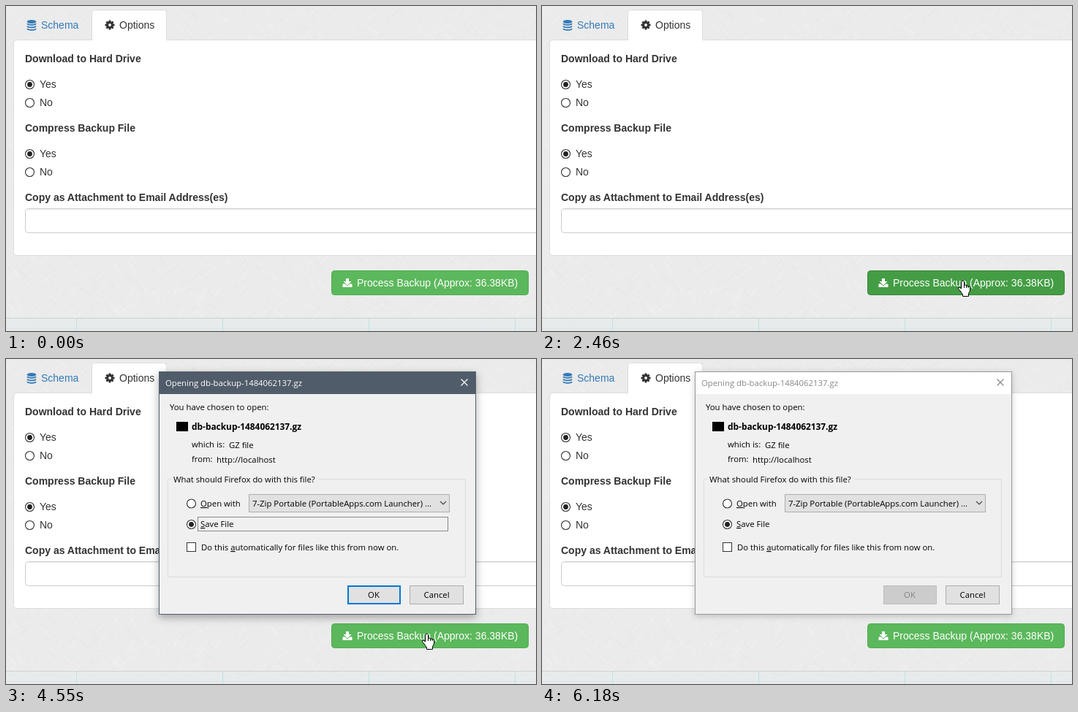
Recreate the animation shown at these times as an HTML page. Size 725 by 445 pixels, loop 6330 ms.

```html
<!DOCTYPE html>
<html lang="en">
<head>
<meta charset="utf-8">
<title>Backup options</title>
<style>
  html, body { margin: 0; width: 100%; height: 100%; overflow: hidden; background: #ebebeb; }
  svg { display: block; width: 725px; height: 445px; }
  text { font: 14px "Liberation Sans", Arial, sans-serif; fill: #333; white-space: pre; }
  .bold { font-weight: bold; }
  #dialog text { font: 11.33px "Open Sans", "Noto Sans", sans-serif; fill: #000; }
  #dialog text.name { font-size: 11.9px; font-weight: bold; }
  #dialog .mid { text-anchor: middle; }
  .key { text-decoration: underline; }
</style>
</head>
<body>
<svg viewBox="0 0 725 445" xmlns="http://www.w3.org/2000/svg">
  <defs>
    <filter id="deep" x="-10%" y="-10%" width="120%" height="125%">
      <feDropShadow dx="0" dy="4" stdDeviation="6" flood-opacity=".32"/>
    </filter>
    <filter id="soft" x="-10%" y="-10%" width="120%" height="120%">
      <feDropShadow dx="0" dy="2" stdDeviation="4" flood-opacity=".2"/>
    </filter>
  </defs>

  <rect width="725" height="445" fill="#ebebeb"/>
  <g id="fibres" fill="none"></g>
  <g id="footer">
    <rect y="427" width="725" height="18" fill="#e6ecec" opacity=".6"/>
    <path d="M0 427.5H725" stroke="#cdd2d2"/>
    <path d="M0 441.5H725" stroke="#cbe5e8" opacity=".6"/>
    <path d="M96.5 428V445M296.5 428V445M496.5 428V445M696.5 428V445" stroke="#bfe1e5"/>
  </g>

  <g id="page">
    <rect x="10.5" y="46.5" width="730" height="295" rx="4" fill="#fff" stroke="#ddd"/>
    <path d="M117.5 47V9.5a4 4 0 0 1 4-4H215.5a4 4 0 0 1 4 4V47" fill="#fff" stroke="#ddd"/>
    <g id="database" fill="#337ab7"><ellipse cx="35" cy="21.5" rx="6.3" ry="2.4"/></g>
    <text x="48" y="31" style="fill:#337ab7">Schema</text>
    <g id="cog" transform="translate(142 26)">
      <circle r="3.4" fill="none" stroke="#333" stroke-width="3"/>
    </g>
    <text x="155" y="31">Options</text>
    <text class="bold" x="26" y="77">Download to Hard Drive</text>
    <text class="bold" x="26" y="172">Compress Backup File</text>
    <text class="bold" x="26" y="267">Copy as Attachment to Email Address(es)</text>
    <rect x="26.5" y="277.5" width="720" height="33" rx="4" fill="#fff" stroke="#ccc"/>
    <path d="M28 278.5H725" stroke="#eee"/>
  </g>

  <g id="button">
    <rect id="face" x="445.5" y="362.5" width="269" height="33" rx="4"/>
    <path d="M465 373h4v4h3.5L467 382.500 461.500 377H465Z" fill="#fff"/>
    <path d="M460.500 380.500h3.200l3.300 3 3.300-3h3.200V385h-13Z" fill="#fff"/>
    <text x="480" y="384" style="fill:#fff">Process Backup (Approx: 36.38KB)</text>
  </g>

  <g id="overlay">
    <rect width="725" height="445" fill="#eee" opacity=".3"/>
    <rect x="529" y="187" width="102" height="102" rx="4" fill="#fafafa" stroke="#ccc" stroke-width="2"/>
    <g id="spinner" transform="translate(580 238)" fill="none" stroke="#62a8bf"></g>
  </g>

  <g id="dialog">
    <rect id="frame" x="209.5" y="17.5" width="433"/>
    <rect id="bar" x="210" y="18" width="432" height="30"/>
    <path id="close" d="M622.5 27.500l9 9m0-9l-9 9" stroke-width="1.2"/>
    <g id="content">
      <text id="title" x="218" y="37">Opening db-backup-1484062137.gz</text>
      <text x="224" y="70">You have chosen to open:</text>
      <rect x="233" y="86" width="16" height="13" fill="#000"/>
      <text class="name" x="254" y="97">db-backup-1484062137.gz</text>
      <text x="254" y="121">which is:</text>
      <text x="305" y="122">GZ file</text>
      <text x="254" y="141">from:</text>
      <text x="288" y="142">http://localhost</text>
      <path d="M226 164.500H221.500V298.500H628.500V164.500H427" fill="none" stroke="#dcdcdc"/>
      <text x="229" y="169">What should Firefox do with this file?</text>
      <text x="266" y="202"><tspan class="key">O</tspan>pen with</text>
      <rect x="332.5" y="185.5" width="274" height="24" fill="#e1e1e1" stroke="#adadad"/>
      <text x="337" y="202">7-Zip Portable (PortableApps.com Launcher) ...</text>
      <path d="M594 195l4 4 4-4" fill="none" stroke="#444" stroke-width="1.2"/>
      <text x="266" y="230"><tspan class="key">S</tspan>ave File</text>
      <rect id="focus" x="262.5" y="216.500" width="342" height="19" fill="none" stroke="#222" stroke-dasharray="1 1"/>
      <rect x="247.500" y="251.500" width="12" height="12" fill="#fff" stroke="#333"/>
      <text x="267" y="262">Do this <tspan class="key">a</tspan>utomatically for files like this from now on.</text>
      <rect id="ok"/>
      <text id="okText" class="mid" x="503" y="327">OK</text>
      <rect x="552.500" y="310.500" width="73" height="25" fill="#e1e1e1" stroke="#adadad"/>
      <text class="mid" x="589" y="327">Cancel</text>
    </g>
  </g>

  <g id="cursor" stroke="#000" stroke-linejoin="round">
    <path fill="#fff" d="M-.5 .5H1.500L2.500 1.500V6H4.500L5.500 7H7L8 8H9.500L10.500 9.500V14L8.500 17.500V21.500H.5V19L-3 14-5.500 11.500V9.500L-4 9-1.500 11V1.500Z"/>
    <path fill="none" d="M2.500 6V10M5.500 7V10M8 8V10"/>
  </g>
</svg>

<script>
const LOOP = 6330;
const $ = id => document.getElementById(id);

function add(parent, tag, attrs) {
  const node = document.createElementNS("http://www.w3.org/2000/svg", tag);
  set(node, attrs);
  parent.append(node);
  return node;
}
function set(node, attrs) {
  for (const key in attrs) node.setAttribute(key, attrs[key]);
}
const show = (id, on) => set($(id), { visibility: on ? "inherit" : "hidden" });

function radio(parent, x, y, checked, size) {
  add(parent, "circle", { cx: x, cy: y, r: size, fill: "#fff", stroke: "#333", "stroke-width": 1.1 });
  if (checked) add(parent, "circle", { cx: x, cy: y, r: size - 2.6, fill: "#222" });
}

function drawFibres() {
  let seed = 7;
  const random = () => (seed = (seed * 16807) % 2147483647) / 2147483647;
  for (const [stroke, opacity] of [["#fff", 0.3], ["#000", 0.022]]) {
    let d = "";
    for (let i = 0; i < 1100; i++) {
      const length = 5 + random() * 16;
      const angle = (random() < 0.5 ? 1 : -1) * (0.6 + random() * 0.4);
      d += `M${(random() * 725).toFixed(1)} ${(random() * 445).toFixed(1)}` +
           `l${(length * Math.cos(angle)).toFixed(1)} ${(length * Math.sin(angle)).toFixed(1)}`;
    }
    add($("fibres"), "path", { d, stroke, "stroke-opacity": opacity });
  }
}

function drawIcons() {
  for (const y of [23.4, 26.9, 30.4])
    add($("database"), "path", { d: `M28.7 ${y}q6.3 3.2 12.6 0v1.400c0 2.600-12.600 2.600-12.600 0Z` });
  for (let a = 0; a < 360; a += 45)
    add($("cog"), "rect", { x: -1.4, y: -6.5, width: 2.8, height: 3, fill: "#333", transform: `rotate(${a})` });
}

function ring(radius, width, count, start, sweep) {
  const point = deg => {
    const a = deg * Math.PI / 180;
    return `${radius * Math.cos(a)} ${radius * Math.sin(a)}`;
  };
  for (let i = 0; i < count; i++) {
    const from = start + i * 360 / count;
    add($("spinner"), "path", {
      d: `M${point(from)}A${radius} ${radius} 0 0 1 ${point(from + sweep)}`,
      "stroke-width": width
    });
  }
}

// Pointer tip at a time, or null while it is off the stage.
function pointer(t) {
  const rest = [575, 376], edge = [572, 438];
  const mix = k => rest.map((v, i) => Math.round(v + (edge[i] - v) * k));
  if (t < 350 || t >= 5630) return null;
  if (t < 660) return mix(1 - Math.floor((t - 350) / 77.5) / 4);
  if (t < 5250) return rest;
  return mix((Math.floor((t - 5250) / 76) + 1) / 5);
}

function drawDialog(t) {
  const loaded = t >= 3620, active = t < 6180, ready = t >= 4550 && active;
  show("dialog", t >= 3540);
  show("content", loaded);
  show("focus", loaded && active);
  set($("frame"), {
    height: loaded ? 332 : 357,
    fill: loaded ? "#f0f0f0" : "#fff",
    stroke: active ? "#55616d" : "#999",
    filter: active ? "url(#deep)" : "url(#soft)"
  });
  set($("bar"), { fill: active ? "#505c69" : "#fff" });
  set($("close"), { stroke: active ? "#fff" : "#888" });
  $("title").style.fill = active ? "#fff" : "#888";
  $("okText").style.fill = ready ? "#000" : "#838383";
  set($("ok"), ready
    ? { x: 468, y: 311, width: 71, height: 24, fill: "#e1e1e1", stroke: "#0078d7", "stroke-width": 2 }
    : { x: 467.5, y: 310.5, width: 72, height: 25, fill: "#ccc", stroke: "#bfbfbf", "stroke-width": 1 });
}

function draw(t) {
  const tip = pointer(t);
  show("cursor", tip);
  if (tip) set($("cursor"), { transform: `translate(${tip[0]} ${tip[1]})` });

  const idle = t >= 3620 && t < 5250;
  const hover = tip && tip[1] < 396 && !idle;
  set($("face"), { fill: hover ? "#449d44" : "#5cb85c", stroke: hover ? "#398439" : "#4cae4c" });

  show("overlay", t >= 1040 && t < 2460);
  set($("overlay"), { opacity: t < 1130 ? 0.5 : 1 });
  drawDialog(t);
}

drawFibres();
drawIcons();
for (const y of [107, 202]) {
  radio($("page"), 32.5, y + 0.5, true, 6);
  radio($("page"), 32.5, y + 25.5, false, 6);
  add($("page"), "text", { x: 46, y: y + 5 }).textContent = "Yes";
  add($("page"), "text", { x: 46, y: y + 30 }).textContent = "No";
}
radio($("content"), 253.5, 198, false, 6);
radio($("content"), 253.5, 226.5, true, 6);
ring(21, 5.6, 4, -145, 66);
ring(15, 3.6, 5, -120, 52);
ring(10, 2.2, 6, -100, 42);

const begin = performance.now();
function tick() {
  draw((performance.now() - begin) % LOOP);
  requestAnimationFrame(tick);
}
tick();
</script>
</body>
</html>
```
